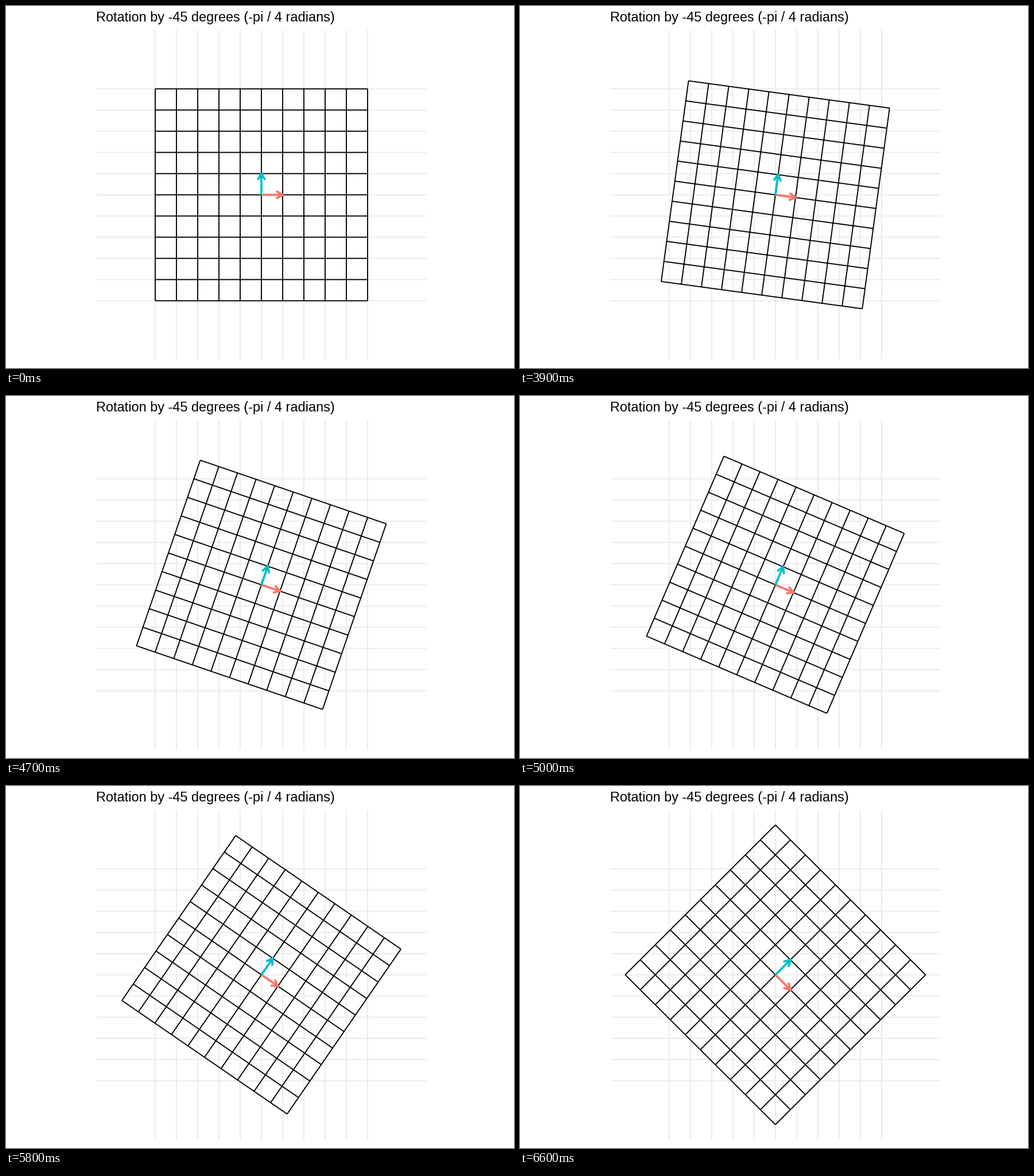
A matplotlib script for the animation above (10000 ms loop, 885 by 632 pixels).

```python
import numpy as np
import matplotlib.pyplot as plt
from matplotlib.animation import FuncAnimation

WIDTH, HEIGHT, DPI = 885, 632, 100
CENTER = np.array([444.93, 329.61])
CELL = 37.0
HALF_GRID = 5
HALF_PANEL = 1.1 * HALF_GRID * np.sqrt(2)

FRAMES, INTERVAL = 100, 100
HOLD, STEPS = 33, 33
ANGLE = -np.pi / 4

THIN, THICK = 1.897, 3.79
HEAD_LENGTH, HEAD_ANGLE = 12.8, np.pi / 6

plt.rcParams["path.simplify"] = False


def points(px):
    return px * 72 / DPI


def to_screen(xy):
    return CENTER + CELL * np.asarray(xy) * [1, -1]


def rotation(angle):
    c, s = np.cos(angle), np.sin(angle)
    return np.array([[c, -s], [s, c]])


def lattice(half_length):
    """Unit-spaced lines in both directions, separated by NaN rows."""
    gap = (np.nan, np.nan)
    rows = []
    for k in range(-HALF_GRID, HALF_GRID + 1):
        rows += [(-half_length, k), (half_length, k), gap]
        rows += [(k, -half_length), (k, half_length), gap]
    return np.array(rows)


def add_line(color, width):
    line, = ax.plot([], [], color=color, lw=points(width),
                    solid_capstyle="butt", solid_joinstyle="round")
    line.set_snap(False)
    return line


def arrow_path(tip):
    back = (CENTER - tip) / np.linalg.norm(CENTER - tip) * HEAD_LENGTH
    left = tip + rotation(HEAD_ANGLE) @ back
    right = tip + rotation(-HEAD_ANGLE) @ back
    return np.array([CENTER, tip, (np.nan, np.nan), left, tip, right])


fig = plt.figure(figsize=(WIDTH / DPI, HEIGHT / DPI), dpi=DPI, facecolor="white")
ax = fig.add_axes([0, 0, 1, 1])
ax.set(xlim=(0, WIDTH), ylim=(HEIGHT, 0))
ax.axis("off")

ax.text(157.15, 27, "Rotation by -45 degrees (-pi / 4 radians)",
        family="Liberation Sans", size=points(23.47), color="black",
        ha="left", va="baseline")

background = add_line("#EBEBEB", THIN)
background.set_data(*to_screen(lattice(HALF_PANEL)).T)

GRID = lattice(HALF_GRID)
grid_line = add_line("black", THIN)
arrows = [add_line("#F8766D", THICK), add_line("#00BFC4", THICK)]


def update(frame):
    # Every point travels in a straight line to its rotated position.
    t = np.clip((frame - HOLD) / STEPS, 0, 1)
    matrix = (1 - t) * np.eye(2) + t * rotation(ANGLE)
    grid_line.set_data(*to_screen(GRID @ matrix.T).T)
    for arrow, basis in zip(arrows, matrix.T):
        arrow.set_data(*arrow_path(to_screen(basis)).T)
    return [grid_line, *arrows]


animation = FuncAnimation(fig, update, frames=FRAMES, interval=INTERVAL,
                          repeat=True, repeat_delay=0)
plt.show()
```
